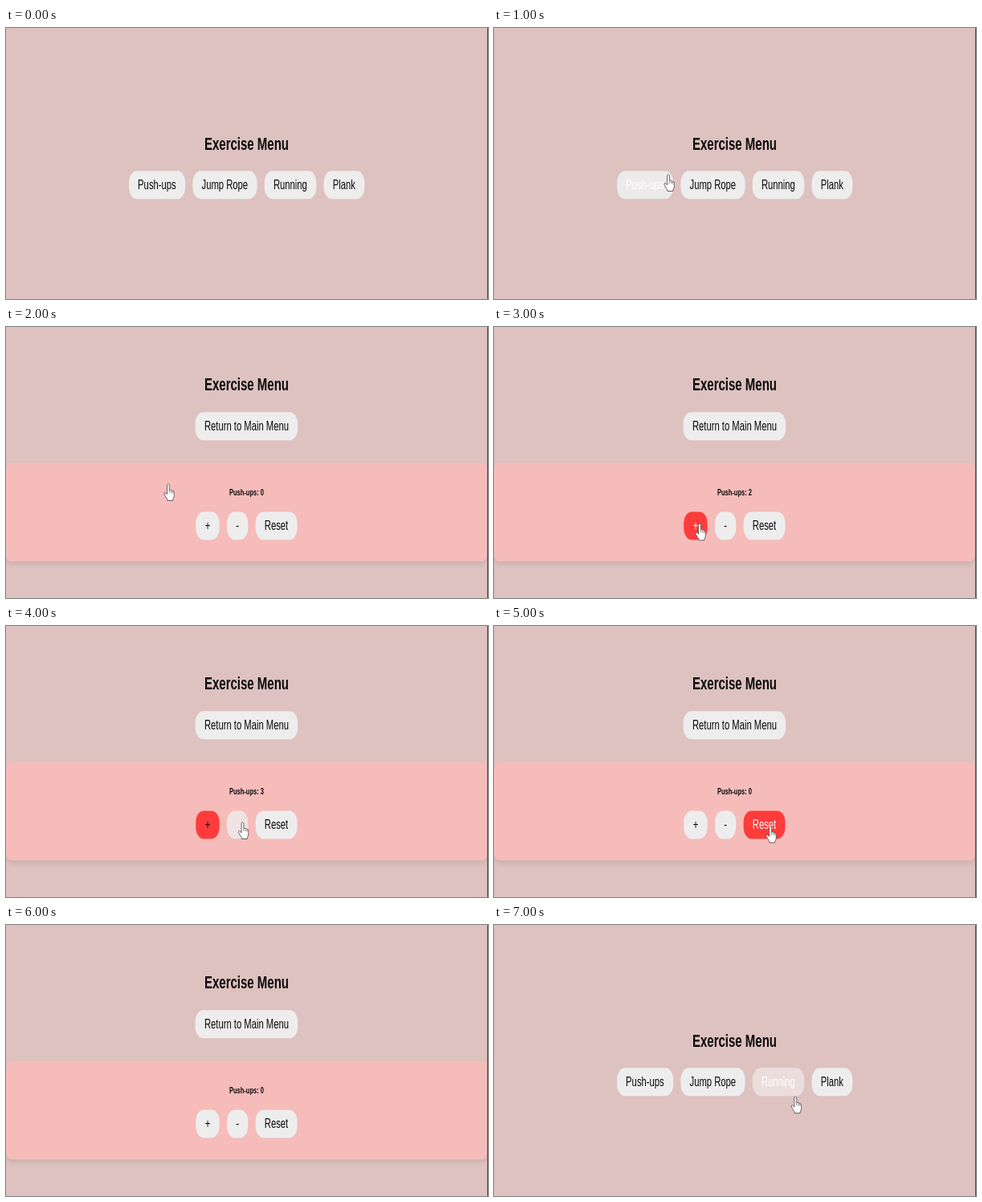
An HTML page that plays this animation: 600x338 px, repeating every 8 s.

```html
<!DOCTYPE html>
<html lang="en">
<head>
<meta charset="utf-8">
<title>Exercise Menu</title>
<style>
  html, body { margin: 0; width: 100%; height: 100%; overflow: hidden; background: #dec2c0; }
  #stage { position: relative; width: 600px; height: 338px; overflow: hidden; background: #dec2c0; }
  /* the page is wider than the stage and is shown squeezed as a whole */
  #page {
    position: absolute; left: 0; top: 0; width: 958.4px; height: 375.6px;
    transform: scale(.625, .9); transform-origin: 0 0;
    font: 18px "Liberation Sans", Arial, sans-serif; color: #0a0a0a;
  }
  #edge { position: absolute; right: 0; top: 0; width: 1px; height: 100%; background: #4d4748; }
  .view { position: absolute; inset: 0; }
  .row, h2, h6 {
    position: absolute; left: 0; width: 100%; margin: 0;
    display: flex; justify-content: center; gap: 15px; white-space: pre;
  }
  h2 { font-size: 24px; line-height: 28px; top: 146.6px; }
  h6 { font-size: 12.06px; line-height: 14px; top: 222px; }
  .row { top: 198px; }
  #counter h2 { top: 66.4px; }
  #counter .row { top: 117.8px; }
  #counter .row.keys { top: 255.8px; }
  .btn { padding: 0 18px; height: 39px; line-height: 39px; border-radius: 16px; background: #eeedee; }
  .card {
    position: absolute; left: 0; top: 187.6px; width: 100%; height: 137.4px;
    border-radius: 10px; background: #f5bcba; box-shadow: 0 4px 8px rgba(0, 0, 0, .1);
  }
  #hand { position: absolute; left: 0; top: 0; width: 600px; height: 338px; }
</style>
</head>
<body>
<div id="stage">
  <div id="page">
    <div class="view" id="menu">
      <h2>Exercise Menu</h2>
      <div class="row">
        <div class="btn" id="push">Push-ups</div>
        <div class="btn">Jump Rope</div>
        <div class="btn" id="run">Running</div>
        <div class="btn">Plank</div>
      </div>
    </div>
    <div class="view" id="counter">
      <h2>Exercise Menu</h2>
      <div class="row"><div class="btn">Return to Main Menu</div></div>
      <div class="card"></div>
      <h6 id="count"></h6>
      <div class="row keys">
        <div class="btn" id="plus">+</div>
        <div class="btn" id="minus">-</div>
        <div class="btn" id="reset">Reset</div>
      </div>
    </div>
  </div>
  <div id="edge"></div>
  <svg id="hand" viewBox="0 0 600 338">
    <g id="cursor" fill="#fff" stroke="#5c5456" stroke-width=".9" stroke-linejoin="round">
      <path d="M-1.4 1.4Q0 -.8 1.4 1.4V8Q2.8 6.8 3.7 8.6Q5 7.6 5.6 9.4Q7.2 8.8 7.3 11V15Q7.2 18 5.8 19.4V21.2H-1.2V19.4Q-3.2 17 -4.9 13.4Q-5.6 11.2 -4 11.2Q-2.6 11.4 -1.4 13.6Z"/>
      <path d="M1.4 8V11.5M3.7 8.8V12M5.6 9.6V12.3" fill="none" stroke-width=".7"/>
    </g>
  </svg>
</div>
<script>
  const $ = id => document.getElementById(id);
  const STEP = 1000, RED = '#ff3b3b', WHITE = '#fff', BLACK = '';

  // one entry per second: view, hand position, count, button looks [background, text]
  const steps = [
    { view: 'menu' },
    { view: 'menu', hand: [217, 182.3], looks: { push: ['#eceaeb', WHITE] } },
    { view: 'counter', hand: [202, 195.3], count: 0 },
    { view: 'counter', hand: [256, 244.8], count: 2, looks: { plus: [RED, WHITE] } },
    { view: 'counter', hand: [294.5, 244.3], count: 3, looks: { plus: [RED, BLACK], minus: ['#efe3e4', WHITE] } },
    { view: 'counter', hand: [344, 249], count: 0, looks: { reset: [RED, WHITE] } },
    { view: 'counter', count: 0 },
    { view: 'menu', hand: [375.3, 213.5], looks: { run: ['#ecdddd', WHITE] } }
  ];
  const buttons = ['push', 'run', 'plus', 'minus', 'reset'];
  let shown = -1;

  function show({ view, hand, count = 0, looks = {} }) {
    for (const id of ['menu', 'counter']) $(id).style.display = id === view ? '' : 'none';
    $('count').textContent = 'Push-ups: ' + count;
    for (const id of buttons) {
      const [back, text] = looks[id] || ['', BLACK];
      $(id).style.background = back;
      $(id).style.color = text;
    }
    $('cursor').style.display = hand ? '' : 'none';
    if (hand) $('cursor').setAttribute('transform', `translate(${hand})`);
  }

  function tick() {
    const i = Math.floor(performance.now() / STEP) % steps.length;
    if (i !== shown) show(steps[shown = i]);
    requestAnimationFrame(tick);
  }
  tick();
</script>
</body>
</html>
```
